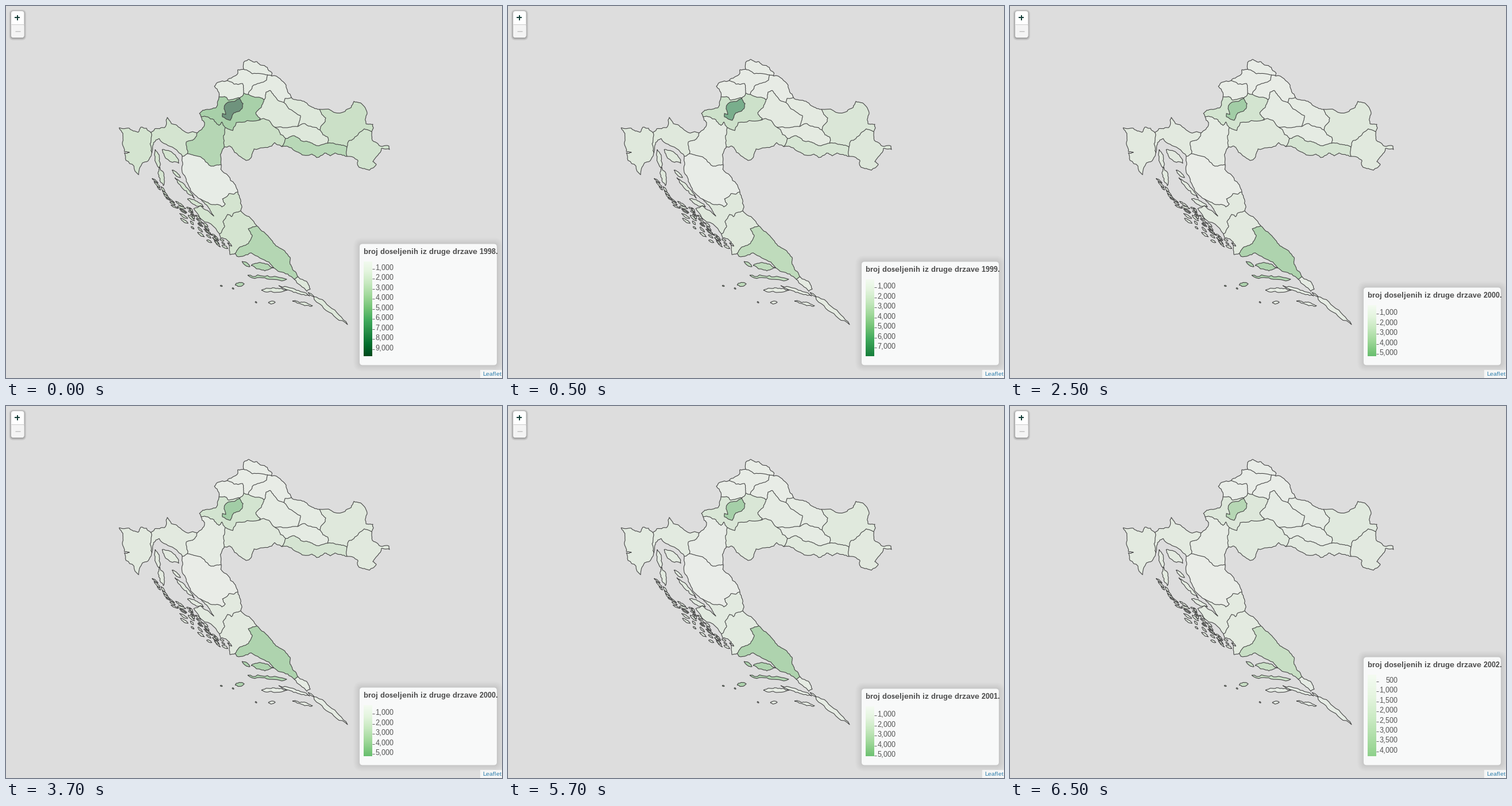
A matplotlib script that plays this animation: 864x648 px, repeating every 8000 ms.

```python
import numpy as np
import matplotlib.pyplot as plt
from matplotlib.animation import FuncAnimation
from matplotlib.collections import LineCollection
from matplotlib.patches import FancyBboxPatch, PathPatch, Rectangle
from matplotlib.path import Path

W, H, DPI = 864, 648, 72  # one point equals one pixel
FIRST_YEAR, YEARS = 1998, 5
FULL_SCALE = 10000
ROW = 17.45  # legend pixels per tick
plt.rcParams.update({"font.family": "Liberation Sans", "text.hinting": "native",
                     "text.hinting_factor": 1})
rng = np.random.default_rng(4)
greens = plt.get_cmap("Greens")

fig = plt.figure(figsize=(W / DPI, H / DPI), dpi=DPI, facecolor="#dddddd")
ax = fig.add_axes([0, 0, 1, 1])

arcs, rings, outlines = {}, {}, []


def roughen(pts, amount=0.08, passes=3):
    """Insert sideways-shifted midpoints so a few key points look like a border."""
    for _ in range(passes):
        step = np.diff(pts, axis=0)
        normal = np.column_stack([-step[:, 1], step[:, 0]])
        shift = rng.normal(0, amount, (len(step), 1)).clip(-0.15, 0.15)
        out = np.empty((2 * len(pts) - 1, 2))
        out[::2] = pts
        out[1::2] = pts[:-1] + step / 2 + normal * shift
        pts = out
    return pts


def arc(name, *xy):
    arcs[name] = roughen(np.array(xy, float).reshape(-1, 2))
    outlines.append(arcs[name])


def region(name, borders):
    """Chain border arcs into one ring, turning each as needed."""
    first, *others = [arcs[b] for b in borders.split()]
    touches = any(np.allclose(first[-1], others[0][i]) for i in (0, -1))
    ring = first if touches else first[::-1]
    for part in others:
        if not np.allclose(part[0], ring[-1]):
            part = part[::-1]
        ring = np.vstack([ring, part[1:]])
    rings[name] = [ring]


def island(name, x0, y0, x1, y1, width):
    """Rough spindle around the line from (x0, y0) to (x1, y1)."""
    a, b = np.array([x0, y0]), np.array([x1, y1])
    side = np.array([y0 - y1, x1 - x0]) / np.hypot(x1 - x0, y1 - y0)
    t = np.linspace(0, 1, 5)[:, None]
    bulge = side * width / 2 * np.sin(np.pi * t) ** 0.6
    line = a + (b - a) * t
    ring = roughen(np.vstack([line + bulge, (line - bulge)[-2::-1]]), 0.12, 2)
    rings[name].append(ring)
    outlines.append(ring)


def archipelago(name, x0, y0, x1, y1, count, spread):
    """Slim islets in three lanes along a line."""
    a, along = np.array([x0, y0]), np.array([x1 - x0, y1 - y0])
    unit = along / np.hypot(*along)
    side = np.array([-unit[1], unit[0]])
    for k in range(count):
        mid = a + along * (k + 0.5) / count + side * spread * (k % 3 - 1)
        half = (unit + side * rng.uniform(-0.2, 0.2)) * rng.uniform(3, 9)
        island(name, *(mid - half), *(mid + half), rng.uniform(2, 4))


# County borders, named after the two sides they part
arc("med_out", 414, 110, 414, 98, 423, 93, 437, 97, 444, 103, 463, 116, 463, 122)
arc("med_var", 414, 110, 429, 118, 456, 120)
arc("med_kop", 456, 120, 463, 122)
arc("var_out", 385, 130, 404, 117, 404, 111, 414, 110)
arc("kra_var", 385, 130, 397, 136, 412, 135, 414, 152)
arc("var_zag", 414, 152, 422, 154)
arc("var_kop", 456, 120, 454, 129, 429, 140, 422, 154)
arc("kra_out", 385, 130, 369, 133, 363, 140, 371, 151, 371, 158)
arc("kra_zag", 371, 158, 384, 159, 388, 164, 407, 160, 414, 152)
arc("kop_zag", 422, 154, 434, 159, 450, 163)
arc("kop_out", 463, 122, 488, 138, 497, 159)
arc("bje_kop", 450, 163, 453, 150, 460, 147, 468, 157, 484, 168)
arc("kop_vir", 484, 168, 486, 161, 497, 159)
arc("bje_vir", 484, 168, 513, 191, 508, 210)
arc("vir_out", 497, 159, 519, 166, 526, 172, 546, 180)
arc("vir_osi", 546, 180, 557, 195, 547, 216)
arc("poz_vir", 508, 210, 521, 205, 547, 216)
arc("bje_poz", 468, 211, 484, 212, 508, 210)
arc("bje_zag", 450, 163, 445, 176, 435, 186, 443, 196, 440, 199)
arc("bje_sis", 440, 199, 449, 196, 468, 211)
arc("poz_sis", 468, 211, 478, 224, 487, 231)
arc("poz_osi", 547, 216, 561, 229, 560, 239)
arc("bro_poz", 487, 231, 502, 226, 513, 234, 529, 237, 540, 243, 560, 239)
arc("bro_osi", 560, 239, 575, 241, 594, 246)
arc("bro_sis", 487, 231, 480, 245)
arc("bro_out", 480, 245, 497, 247, 511, 256, 533, 258, 541, 264, 555, 256, 565, 261,
    573, 256, 594, 262)
arc("bro_vuk", 594, 246, 594, 262)
arc("osi_vuk", 594, 246, 597, 235, 606, 231, 624, 214, 637, 219)
arc("osi_out", 546, 180, 587, 185, 601, 177, 606, 166, 618, 169, 629, 188, 627, 205,
    639, 206, 637, 219)
arc("vuk_out", 637, 219, 638, 234, 650, 243, 667, 244, 668, 250, 654, 248, 639, 271,
    645, 276, 633, 286, 615, 281, 613, 269, 594, 262)
arc("sis_out", 480, 245, 468, 238, 463, 244, 432, 249, 423, 268, 418, 269, 398, 255,
    390, 244, 380, 246)
arc("kar_sis", 382, 212, 379, 231, 380, 246)
arc("sis_zag", 382, 212, 395, 217, 401, 203, 440, 199)
arc("kar_zag", 340, 193, 362, 198, 371, 208, 376, 202, 382, 212)
arc("zag_out", 340, 193, 337, 187, 351, 180, 366, 177, 371, 158)
arc("city", 407, 160, 413, 170, 411, 179, 397, 186, 391, 199, 377, 193, 377, 187,
    383, 189, 380, 178, 388, 167, 407, 160)
arc("kar_out", 340, 193, 346, 203, 341, 215, 333, 221)
arc("kar_pgz", 333, 221, 325, 234, 314, 237, 316, 257)
arc("kar_lik", 316, 257, 331, 261, 357, 279, 375, 277)
arc("kar_east", 380, 246, 376, 253, 375, 277)
arc("pgz_out", 252, 220, 259, 214, 276, 212, 281, 194, 288, 205, 304, 213, 333, 221)
arc("ist_pgz", 252, 220, 251, 240, 254, 256)
arc("pgz_sea", 254, 256, 257, 238, 267, 231, 293, 248, 307, 262)
arc("lik_pgz", 307, 262, 316, 257)
arc("ist_out", 197, 212, 215, 213, 230, 220, 235, 211, 252, 220)
arc("ist_sea", 197, 212, 204, 234, 206, 253, 215, 255, 206, 256, 209, 269, 231, 294,
    238, 273, 250, 266, 254, 256)
arc("lik_sea", 307, 262, 307, 290, 319, 315, 338, 336)
arc("lik_out", 375, 277, 374, 284, 398, 310, 404, 324)
arc("lik_zad", 338, 336, 360, 346, 376, 350, 382, 345, 377, 336, 388, 327, 404, 324)
arc("zad_out", 404, 324, 411, 350, 409, 357)
arc("zad_sib", 409, 357, 393, 367, 386, 363, 378, 375, 381, 383, 372, 397)
arc("zad_sea", 338, 336, 352, 350, 362, 366, 339, 348, 327, 353, 337, 369, 372, 397)
arc("sib_out", 409, 357, 420, 366, 437, 383)
arc("sib_spl", 437, 383, 422, 388, 429, 400, 422, 414, 406, 421, 399, 431)
arc("sib_sea", 372, 397, 374, 404, 389, 411, 390, 433, 399, 431)
arc("spl_out", 437, 383, 456, 400, 473, 419, 495, 438, 497, 453, 509, 472)
arc("spl_sea", 399, 431, 402, 436, 427, 430, 458, 446, 477, 463, 502, 476)
arc("dub_spl", 509, 472, 502, 476)
arc("dub_out", 509, 472, 524, 480, 530, 493, 524, 497, 502, 476)

for name, borders in {
    "med": "med_out med_kop med_var",
    "var": "var_out med_var var_kop var_zag kra_var",
    "kra": "kra_out kra_var kra_zag",
    "kop": "med_kop kop_out kop_vir bje_kop kop_zag var_kop",
    "bje": "bje_kop bje_vir bje_poz bje_sis bje_zag",
    "vir": "vir_out vir_osi poz_vir bje_vir kop_vir",
    "poz": "poz_vir poz_osi bro_poz poz_sis bje_poz",
    "osi": "osi_out osi_vuk bro_osi poz_osi vir_osi",
    "vuk": "vuk_out bro_vuk osi_vuk",
    "bro": "bro_out bro_vuk bro_osi bro_poz bro_sis",
    "sis": "sis_out kar_sis sis_zag bje_sis poz_sis bro_sis",
    "zag": "zag_out kra_zag var_zag kop_zag bje_zag sis_zag kar_zag",
    "kar": "kar_out kar_zag kar_sis kar_east kar_lik kar_pgz",
    "pgz": "pgz_out kar_pgz lik_pgz pgz_sea ist_pgz",
    "ist": "ist_out ist_pgz ist_sea",
    "lik": "lik_sea lik_zad lik_out kar_lik lik_pgz",
    "zad": "lik_zad zad_out zad_sib zad_sea",
    "sib": "sib_out sib_spl sib_sea zad_sib",
    "spl": "spl_out dub_spl spl_sea sib_spl",
    "dub": "dub_out dub_spl",
}.items():
    region(name, borders)
rings["city"] = [arcs["city"]]

# Larger islands
island("pgz", 272, 250, 301, 274, 14)
island("pgz", 260, 250, 267, 282, 8)
island("pgz", 267, 280, 274, 313, 9)
island("pgz", 289, 286, 304, 299, 5)
island("zad", 294, 299, 328, 335, 6)
island("zad", 316, 336, 344, 350, 7)
island("spl", 427, 452, 466, 456, 12)
island("spl", 411, 445, 425, 454, 5)
island("spl", 421, 469, 489, 476, 6)
island("spl", 399, 486, 415, 484, 7)
island("spl", 394, 491, 397, 493, 2)
island("spl", 373, 487, 377, 488, 2)
island("dub", 445, 495, 490, 495, 8)
island("dub", 475, 487, 529, 505, 6)
island("dub", 499, 514, 534, 522, 4)
island("dub", 457, 517, 469, 516, 5)
island("dub", 434, 515, 437, 517, 2)
island("dub", 526, 499, 595, 555, 9)

# Strings of islets along the coast
archipelago("pgz", 256, 303, 284, 334, 6, 2)
archipelago("zad", 282, 340, 330, 362, 9, 4)
archipelago("zad", 302, 360, 370, 415, 14, 6)
archipelago("zad", 318, 355, 356, 394, 9, 3)
archipelago("sib", 358, 402, 390, 420, 7, 4)

# Arrivals per year: uneven series, and first-year counts that fade after the 1998 wave
arrivals = {
    "city": [9830, 7970, 5330, 5170, 4290],
    "zag": [5000, 2830, 2420, 1920, 1580],
    "spl": [4350, 3750, 4700, 4700, 3150],
    "kar": [4300, 830, 700, 420, 550],
    "bro": [4140, 2170, 2250, 1330, 1110],
    "lik": [374, 295, 226, 185, 213],
}
fade = 0.43 + 0.57 * np.exp(-1.1 * np.arange(YEARS))
for names, start in {"osi sis": 3000, "vuk": 2560, "pgz ist zad sib": 2350,
                     "dub bje vir poz": 1500, "med var kra kop": 700}.items():
    arrivals.update((name, start * fade) for name in names.split())


def land_color(count):
    """Half-transparent fill over the grey page."""
    return 0.5 * np.array(greens(count / FULL_SCALE)[:3]) + 0.5 * 0xDD / 255


counties = {}
for name, shapes in rings.items():
    path = Path.make_compound_path(*(Path(r) for r in shapes))
    counties[name] = ax.add_patch(PathPatch(path, lw=0, zorder=2 if name == "city" else 1))
ax.add_collection(LineCollection(outlines, colors="#444444", linewidths=1.1, zorder=3))


def panel(x, y, w, h, radius, color, blur, strength, drop=0):
    """Rounded box with a soft shadow."""
    def box(grow, dy, **style):
        r = radius + grow
        return ax.add_patch(FancyBboxPatch(
            (x + radius, y + radius + dy), w - 2 * radius, h - 2 * radius,
            boxstyle=f"round,pad={r},rounding_size={r}", lw=0, zorder=5, **style))
    layers = [box(blur * (k / 12) ** 1.3, drop, fc="black", alpha=strength / 12)
              for k in range(12, 0, -1)]
    return layers + [box(0, 0, fc=color)]


def build_legend(index):
    counts = [series[index] for series in arrivals.values()]
    low, high = min(counts), max(counts)
    unit = 1000 if high > 5000 else 500
    bottom = 610
    bar_top = round(bottom - (high - low) / unit * ROW)
    top = bar_top - 30.5
    parts = panel(616, top, 239, 625.5 - top, 5, "#f8f9f9", 11, 0.075)
    parts.append(ax.text(623, top + 17.5,
                         f"broj doseljenih iz druge drzave {FIRST_YEAR + index}.",
                         size=13, weight="bold", color="#4a4a4a", zorder=6))
    ramp = np.linspace(low, high, bottom - bar_top)[:, None]
    parts.append(ax.imshow(ramp, cmap=greens, vmin=0, vmax=FULL_SCALE, aspect="auto",
                           extent=(623, 638, bottom, bar_top), zorder=6))
    for value in range(unit, int(high) + 1, unit):
        y = bottom - (high - value) / unit * ROW
        parts.append(ax.text(675.5, round(y) + 4, f"{value:,}", size=13, ha="right",
                             color="#555555", zorder=6))
        parts += ax.plot([638, 641.5], [round(y) + 1.5] * 2, color="#666666", lw=1,
                         solid_capstyle="butt", zorder=6)
    return parts


legends = [build_legend(i) for i in range(YEARS)]

# Zoom buttons and attribution
panel(9, 9, 22.5, 46, 4, "#ffffff", 4, 0.3, drop=1)
ax.add_patch(FancyBboxPatch((13, 36), 14.5, 15, boxstyle="round,pad=4,rounding_size=4",
                            fc="#f4f4f4", lw=0, zorder=6))
for xs, ys, color, lw in [
    ([9, 31.5], [31.5, 31.5], "#cccccc", 1),
    ([15, 24], [20, 20], "#173f39", 2),
    ([19.5, 19.5], [15.5, 24.5], "#173f39", 2),
    ([16, 25], [43.5, 43.5], "#bbbbbb", 1.3),
]:
    ax.plot(xs, ys, color=color, lw=lw, solid_capstyle="butt", zorder=7)
ax.add_patch(Rectangle((826, 634), 38, 14, fc="#f5f5f5", lw=0, zorder=5))
ax.text(830.5, 644.5, "Leaflet", size=10, color="#2a7cab", zorder=6)

ax.set(xlim=(0, W), ylim=(H, 0))
ax.axis("off")


def update(n):
    index = (n + 3) // 4  # first year holds 500 ms, the others up to 2000 ms
    for name, patch in counties.items():
        patch.set_facecolor(land_color(arrivals[name][index]))
    for i, parts in enumerate(legends):
        for part in parts:
            part.set_visible(i == index)
    return []


anim = FuncAnimation(fig, update, frames=16, interval=500, repeat=True, repeat_delay=0,
                     blit=False)
plt.show()
```
